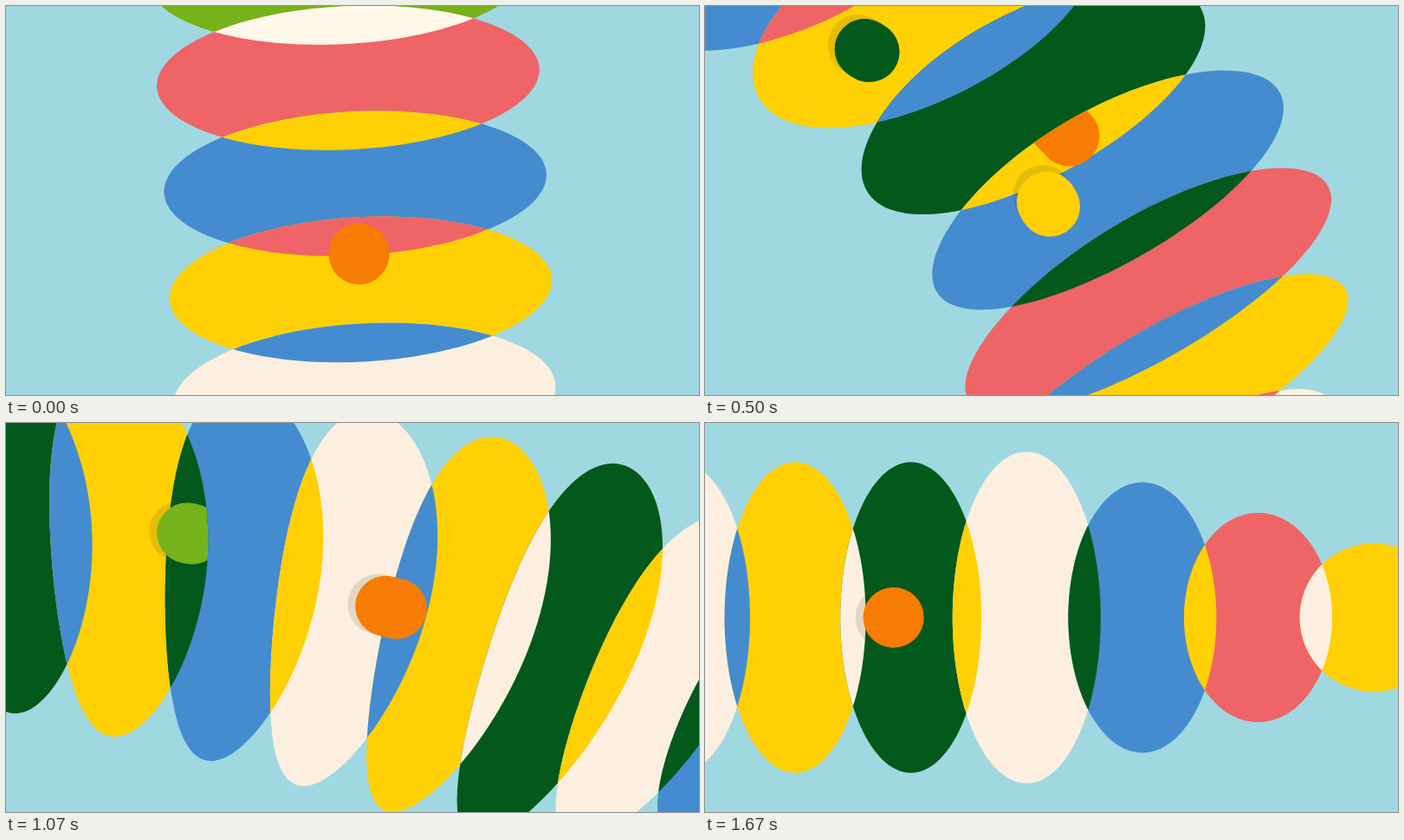
Animation of 800x450 px, one loop 1.7 s. Source, as an HTML page with a canvas:

```html
<!DOCTYPE html>
<html>
<head>
<meta charset="utf-8">
<style>
html, body { margin: 0; width: 100%; height: 100%; overflow: hidden; background: #a0d8e1; }
canvas { display: block; }
</style>
</head>
<body>
<canvas id="stage" width="800" height="450"></canvas>
<script>
const ctx = document.getElementById('stage').getContext('2d');
const LOOP = 1700, STEP = 100 / 3, RAD = Math.PI / 180;
const { sin, cos, min, max, abs } = Math;
const COLORS = {
  r: '#ef6467', y: '#ffd004', b: '#448ccf', c: '#fcefdf', g: '#02591b',
  l: '#76b219', o: '#f77c03', w: '#fff8e8'
};
// Colours of the discs, and of the overlap of each disc with the next.
const DISCS = 'lrbycrbygbrycbgybcygcbry';
const OVERLAPS = 'wyrbycrbygbrycbgybcygyc';

// tick, chain index at the anchor, anchor height, turn in degrees, orange ball index
const KEYS = [
  [0, 1.31, 120.8, 3, 2.665],
  [11, 5.8, 117, 19.8, 5.7],
  [19, 10.83, 152, 44.6, 11.03],
  [26, 14.69, 179, 65.6, 15.5],
  [32, 17.07, 205, 77.9, 17.35],
  [38, 18.71, 221, 84.3, 18.25],
  [50, 20.29, 225, 90, 18.85]
];

// Small balls: each passes an index and offset at a tick, at a steady rate and drift.
const BALLS = [
  { color: 'g', tick: 11, index: 5.66, rate: .333, v: -.37, drift: 0 },
  { color: 'y', tick: 15, index: 8.85, rate: .362, v: -.29, drift: .016 },
  { color: 'l', tick: 26, index: 14.35, rate: .194, v: .3, drift: -.025 },
  { color: 'r', tick: 26, index: 12.9, rate: .13, v: -.37, drift: 0 },
  { color: 'b', tick: 32, index: 13.93, rate: .246, v: -.1, drift: -.025 }
];
const BALL_LIFE = 9;

// Smooth curve through the keys.
function keysAt(tick) {
  const last = KEYS.length - 1;
  let n = 0;
  while (n < last - 1 && tick >= KEYS[n + 1][0]) n++;
  const gap = k => KEYS[k + 1][0] - KEYS[k][0];
  const h = gap(n), s = (tick - KEYS[n][0]) / h, r = 1 - s;
  return KEYS[n].map((a, j) => {
    const b = KEYS[n + 1][j];
    const rate = k => (KEYS[k + 1][j] - KEYS[k][j]) / gap(k);
    const inner = k => (gap(k) * rate(k - 1) + gap(k - 1) * rate(k)) / (gap(k) + gap(k - 1));
    const slope = k => k === 0 ? 2 * rate(0) - inner(1)
      : k === last ? 2 * rate(last - 1) - inner(last - 1) : inner(k);
    return a * (1 + 2 * s) * r * r + b * s * s * (3 - 2 * s)
      + h * s * r * (slope(n) * r - slope(n + 1) * s);
  });
}

function draw(tick) {
  const [, anchor, y, degrees, orange] = keysAt(tick);
  const turn = degrees * RAD, twice = sin(2 * turn);
  const late = min(1, max(0, (tick - 38) / 12));
  const settle = late * late * (3 - 2 * late);

  // The chain turns from vertical to horizontal and bends on the way.
  const x = 397 + 13 * sin(turn);
  const lead = 11.5 * twice * (cos(2 * turn) + .7) - cos(turn);
  const heading = turn + lead * RAD;
  const spacing = 122 + 23 * twice ** 2 + degrees / 30 + 8.6 * settle;
  const bend = cos(turn) * (29 * twice - 2);
  const fan = 52 * sin(turn) ** 2 * twice;
  const bow = min(0, 26 * sin(4 * turn));

  // Bent coordinates: index along the chain, v across it.
  const place = (index, v) => {
    const u = index - anchor;
    return [
      x + spacing * sin(heading) * u + 221 * cos(turn) * v
        - .96 * bend * u * u + fan * u * v + bow * v * v,
      y + spacing * cos(heading) * u - 221 * sin(turn) * v + .25 * bend * u * u
    ];
  };

  const disc = i => {
    const path = new Path2D();
    const tall = i < 20 ? 1 - .187 * settle : .868 - .16 * (i - 20);
    const half = .68 - (i < 20 ? .07 : .04) * settle;
    for (let a = 0; a < 360; a += 3) {
      path.lineTo(...place(i + half * cos(a * RAD), tall * sin(a * RAD)));
    }
    path.closePath();
    return path;
  };

  const ball = (color, index, v, stretch) => {
    const [cx, cy] = place(index, v);
    const [nx, ny] = place(index + .01, v);
    const d = Math.hypot(nx - cx, ny - cy) || 1;
    const dx = (nx - cx) / d, dy = (ny - cy) / d;
    const half = max(stretch, .1) / 2;
    const capsule = (shift, style) => {
      ctx.strokeStyle = style;
      ctx.beginPath();
      ctx.moveTo(cx + dx * (shift - half), cy + dy * (shift - half));
      ctx.lineTo(cx + dx * (shift + half), cy + dy * (shift + half));
      ctx.stroke();
    };
    ctx.lineCap = 'round';
    ctx.lineWidth = 70;
    capsule(-9 * min(1, tick / 6), 'rgba(40,40,20,.12)');
    capsule(0, COLORS[color]);
  };

  ctx.fillStyle = '#a0d8e1';
  ctx.fillRect(0, 0, 800, 450);

  const shown = [];
  for (let i = 0; i < DISCS.length; i++) {
    if (abs(i - anchor) < 4.8) shown.push([i, disc(i)]);
  }
  for (const [i, path] of shown) {
    ctx.fillStyle = COLORS[DISCS[i]];
    ctx.fill(path);
  }
  for (let k = 0; k < shown.length - 1; k++) {
    ctx.save();
    ctx.clip(shown[k][1]);
    ctx.fillStyle = COLORS[OVERLAPS[shown[k][0]]];
    ctx.fill(shown[k + 1][1]);
    ctx.restore();
  }

  // Balls weave: in front of odd discs, behind even ones.
  const front = new Path2D();
  for (const [i, path] of shown) if (i % 2) front.addPath(path);
  ctx.save();
  ctx.clip(front);
  for (const b of BALLS) {
    const age = tick - b.tick;
    if (abs(age) < BALL_LIFE) ball(b.color, b.index + b.rate * age, b.v + b.drift * age, 6);
  }
  ball('o', orange, 0, 78 * twice ** 2);
  ctx.restore();
}

const start = performance.now();
function loop() {
  const t = (performance.now() - start) % LOOP;
  draw(min(50, Math.floor((t + 4) / STEP)));
  requestAnimationFrame(loop);
}
loop();
</script>
</body>
</html>
```
